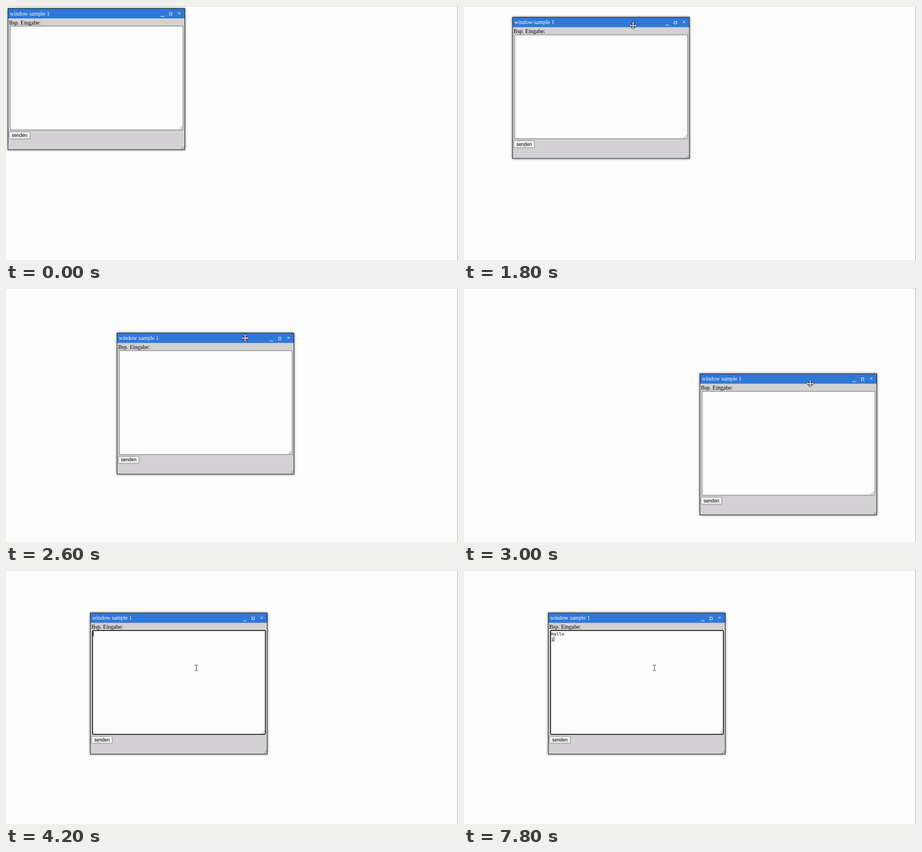
Animation, 800 px wide and 450 px high, one loop 8000 ms. Source, as an HTML page:

```html
<!DOCTYPE html>
<html lang="de">
<head>
<meta charset="utf-8">
<title>Window drag</title>
<style>
html, body { margin: 0; width: 100%; height: 100%; overflow: hidden; background: #fefdfe; }
svg { display: block; width: 100vw; height: 100vh; }
text { white-space: pre; }
.serif { font: 10px "Liberation Serif", serif; }
.sans { font: 8.33px "Liberation Sans", sans-serif; }
.mono { font: 7.73px "DejaVu Sans Mono", monospace; }
</style>
</head>
<body>
<svg viewBox="0 0 800 450">
  <defs>
    <filter id="soft" x="-5%" y="-5%" width="110%" height="110%">
      <feGaussianBlur stdDeviation="2.2"/>
    </filter>
    <path id="grip" d="M0 6L6 0M3 6L6 3" fill="none" stroke="#777" stroke-width=".8"/>
  </defs>
  <rect width="800" height="450" fill="#fefdfe"/>
  <rect width="800" height="1" fill="#e1e0e4"/>
  <rect x="799" width="1" height="450" fill="#b0aeb4"/>

  <g id="win">
    <rect width="314" height="251" fill="#000" opacity=".55" filter="url(#soft)"/>
    <rect x=".5" y=".5" width="313" height="250" fill="#d3d1d3"/>
    <rect x=".5" y=".5" width="313" height="17.5" fill="#3078d7"/>
    <rect x=".5" y=".5" width="313" height="250" fill="none" stroke="#16181c" stroke-width=".9"/>
    <rect id="mark" x="3.7" y="4" width="70.6" height="11" fill="#2b50d2"/>
    <text class="serif" x="3.7" y="12.5" fill="#fff">window sample 1</text>
    <path d="M270.5 14.4h6.3M286.4 8h4.3v4.3h-4.3zM301.9 7l3.9 3.9m0-3.9l-3.9 3.9" fill="none" stroke="#fff" stroke-width=".9"/>
    <text class="serif" x="2.3" y="28.6">Bsp. Eingabe:</text>
    <rect id="area" x="4.4" y="31.6" width="305.9" height="184" fill="#fefdfe"/>
    <use href="#grip" x="303.5" y="208.5"/>
    <use href="#grip" x="307" y="244"/>
    <rect x="2.5" y="218.9" width="37" height="12.6" rx="1.6" fill="#efeff0" stroke="#767676" stroke-width=".8"/>
    <text class="sans" x="21" y="228.1" text-anchor="middle">senden</text>
    <text id="line1" class="mono" x="5.3" y="40.7"></text>
    <text id="line2" class="mono" x="5.3" y="50"></text>
    <rect id="caret" width=".9" height="9" fill="#000"/>
  </g>

  <path id="arrow" d="M0 0v13l3-2.8 2 4.6 2-.9-2-4.4h4.2z" fill="#fff" stroke="#111" stroke-width=".9"/>
  <path id="beam" d="M-2.5-5h1.7L0-4.2.8-5h1.7M0-4.2v8.4M-2.5 5h1.7L0 4.2.8 5h1.7" fill="none" stroke="#222" stroke-width=".9"/>
  <path id="move" d="M0-6.5L2.8-3.5H1.1V-1.1H3.5V-2.8L6.5 0 3.5 2.8V1.1H1.1V3.5H2.8L0 6.5-2.8 3.5H-1.1V1.1H-3.5V2.8L-6.5 0-3.5-2.8V-1.1H-1.1V-3.5H-2.8Z" fill="#fff" stroke="#1c2430" stroke-width=".9"/>
</svg>
<script>
const LOOP = 8000, STEP = 200, CHAR = 4.65, LINE = 9.3;
const GRAB = 1200, ORBIT = 2400, RELEASE = 3700, REST = 4000, FOCUS = 4200;
const LEAD = 40; // the window trails the pointer by this many ms

const TEXT = "Hallo\n1";
const strokes = [5200, 5600, 6000, 6200, 6400, 7000, 7800];

const $ = id => document.getElementById(id);
const [win, mark, area, caret, line1, line2] =
  ["win", "mark", "area", "caret", "line1", "line2"].map($);
const pointers = ["arrow", "beam", "move"].map($);

const show = (el, on) => el.setAttribute("visibility", on ? "visible" : "hidden");
const place = (el, x, y) => el.setAttribute("transform", `translate(${x} ${y})`);

// The window is swung clockwise on a tilted ellipse, once in 1.2 s
function orbit(t) {
  const a = (t - 3000) / 600 * Math.PI;
  return { x: 269.75 + 147.25 * Math.cos(a), y: 129.25 + 50 * Math.sin(a + .461) };
}

const route = [
  { t: GRAB, x: 3, y: 4 },
  { t: 1800, x: 85.5, y: 19.5 },
  { t: 2000, x: 160, y: 50 },
  { t: 2200, x: 156, y: 118.5 },
  { t: ORBIT, ...orbit(ORBIT) },
  { t: RELEASE, ...orbit(RELEASE) },
  { t: REST, x: 148.8, y: 75.6 }
];

function windowAt(t) {
  if (t > ORBIT && t < RELEASE) return orbit(t);
  t = Math.min(Math.max(t, GRAB), REST);
  const i = route.findIndex(k => k.t >= t) || 1;
  const a = route[i - 1], b = route[i], p = (t - a.t) / (b.t - a.t);
  return { x: a.x + (b.x - a.x) * p, y: a.y + (b.y - a.y) * p };
}

const bezier = (a, b, c, p) => (1 - p) ** 2 * a + 2 * p * (1 - p) * b + p * p * c;

function pointerAt(t) {
  if (t < STEP) return { kind: -1, x: 0, y: 0 };
  if (t >= FOCUS) return { kind: 1, x: 337, y: 173.5 };
  if (t >= GRAB) {
    const w = windowAt(t + LEAD);
    return { kind: 2, x: w.x + 199, y: w.y + 9 };
  }
  const p = (t - STEP) / (GRAB - STEP);
  const x = bezier(549, -310, 207, p), y = bezier(204, 60, 14, p);
  return { kind: x > 317 ? 0 : y > 35 ? 1 : 2, x, y };
}

function drawText(t) {
  const typed = strokes.filter(s => s <= t);
  const lines = TEXT.slice(0, typed.length).split("\n");
  const row = lines.length - 1;
  line1.textContent = lines[0];
  line2.textContent = lines[1] || "";
  caret.setAttribute("x", 5.2 + lines[row].length * CHAR);
  caret.setAttribute("y", 32.9 + row * LINE);
  const idle = t - (typed.pop() || FOCUS + STEP);
  show(caret, t >= FOCUS && idle < 400);
}

function draw(t) {
  const w = windowAt(t), pointer = pointerAt(t), focus = t >= FOCUS;
  place(win, w.x, w.y);
  pointers.forEach((el, i) => {
    show(el, i === pointer.kind);
    place(el, pointer.x, pointer.y);
  });
  show(mark, t >= 3400 && !focus);
  area.setAttribute("stroke", focus ? "#101014" : "#767676");
  area.setAttribute("stroke-width", focus ? 1.5 : 1);
  area.setAttribute("rx", focus ? 1.5 : 0);
  drawText(t);
}

function tick() {
  const t = performance.now() % LOOP;
  draw(Math.floor(t / STEP) * STEP);
  requestAnimationFrame(tick);
}
tick();
</script>
</body>
</html>
```
